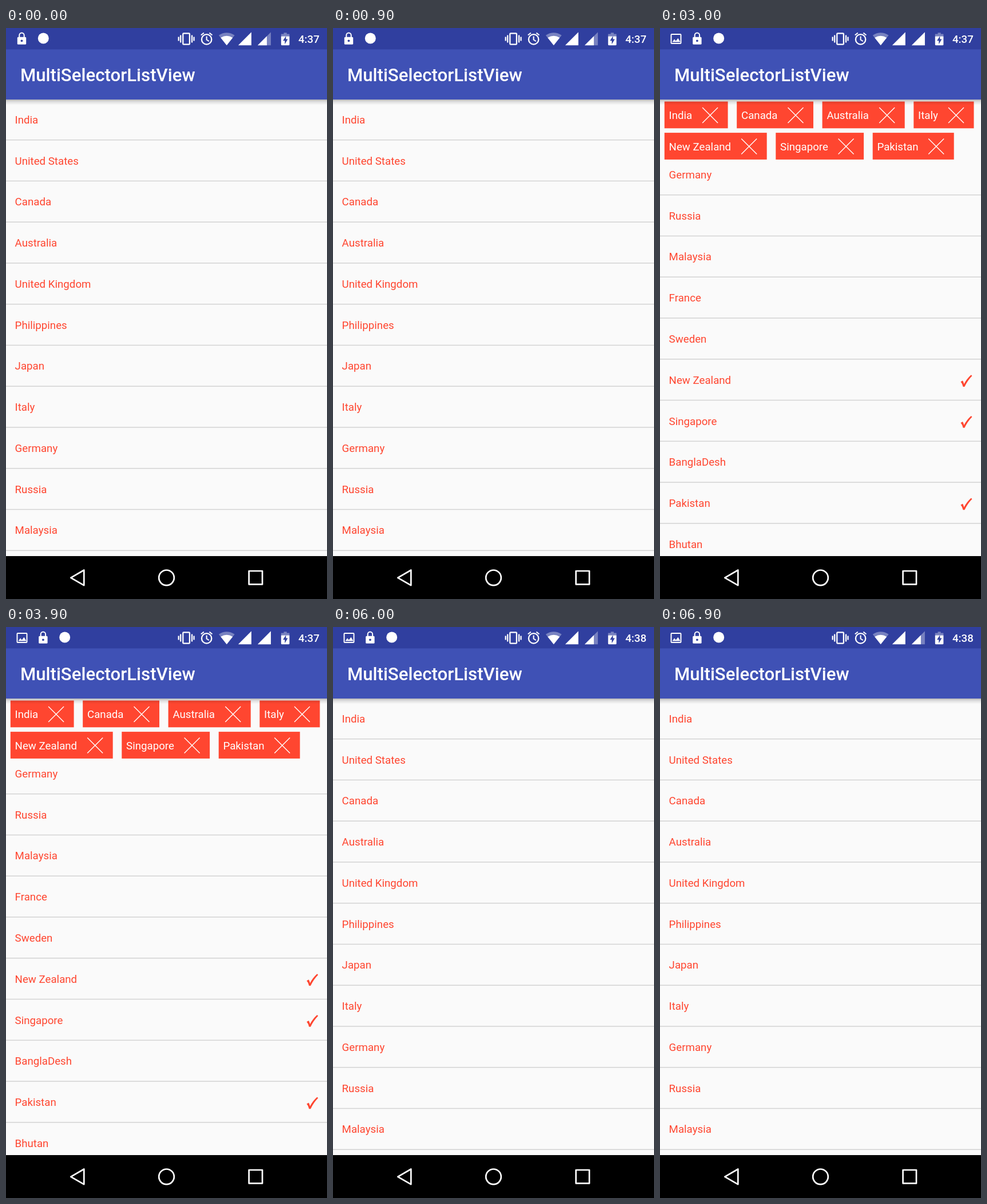
An HTML page for the animation above (7.5 s loop, 561x998 px).

```html
<!DOCTYPE html>
<html lang="en">
<head>
<meta charset="utf-8">
<title>MultiSelectorListView</title>
<style>
  html, body { margin: 0; width: 100%; height: 100%; overflow: hidden; background: #fafafa; }
  svg { display: block; width: 561px; height: 998px; }
  text { font-family: Roboto, sans-serif; font-size: 18.7px; white-space: pre; }
  .medium { font-weight: 500; fill: #fff; }
  .accent { fill: #ff4630; }
  .faded { fill: #fff; opacity: .35; }
  .line { fill: none; stroke: #fff; }
</style>
</head>
<body>
<svg viewBox="0 0 561 998">
  <defs>
    <linearGradient id="shade" x2="0" y2="1">
      <stop offset="0" stop-opacity=".29"/>
      <stop offset=".4" stop-opacity=".12"/>
      <stop offset="1" stop-opacity="0"/>
    </linearGradient>
    <clipPath id="listClip"><rect id="listBox" width="561"/></clipPath>
  </defs>
  <rect width="561" height="998" fill="#fafafa"/>
  <g clip-path="url(#listClip)"><g id="list"></g></g>
  <g id="chips"></g>

  <rect y="124.5" width="561" height="10" fill="url(#shade)"/>
  <rect width="561" height="125" fill="#3f51b5"/>
  <rect width="561" height="37.4" fill="#303f9f"/>
  <text class="medium" x="24.9" y="93.3" style="font-size:31.2px">MultiSelectorListView</text>

  <g id="picture">
    <path fill="#fff" fill-rule="evenodd" d="M20.500 10h15a2 2 0 0 1 2 2v14a2 2 0 0 1-2 2h-15a2 2 0 0 1-2-2v-14a2 2 0 0 1 2-2zM20.500 12v14h15v-14z"/>
    <path fill="#fff" d="M21.500 24.500l3.600-5 2.700 3.300 3.700-5 4 6.700z"/>
  </g>
  <g id="notices">
    <rect x="19.800" y="15.800" width="15.400" height="13" rx="1.600" fill="#fff"/>
    <path class="line" stroke-width="2" d="M23.300 16v-3.200a4.200 4.200 0 0 1 8.400 0v3.200"/>
    <circle cx="27.500" cy="22.300" r="1.900" fill="#303f9f"/>
    <circle cx="65.300" cy="18" r="9.500" fill="#fff"/>
  </g>

  <g class="line" stroke-width="2.300">
    <rect x="309.300" y="9.400" width="11.600" height="19.200" rx="1.200"/>
    <path d="M305.200 12.500v13M301.700 15.500v7M325 12.500v13M328.500 15.500v7"/>
    <circle cx="350.600" cy="19.900" r="8.700"/>
    <path stroke-width="2" d="M350.600 14.500v6l4.200 2.600M340.800 12.600l5-4.200M355.400 8.400l5 4.200"/>
  </g>
  <path class="faded" d="M385.700 30.300L371.800 12.700Q385.700 4 399.600 12.700z"/>
  <path fill="#fff" d="M385.700 30.300L375.200 17Q385.700 10.400 396.200 17z"/>
  <path fill="#fff" d="M405.800 30.300L428.800 7.300V30.300z"/>
  <path class="faded" d="M439.900 30.300L462.900 7.300V30.300z"/>
  <path id="signal" fill="#fff"/>
  <path class="faded" d="M480.800 14.500V10.500h4.700V8.200h5.200v2.300h4.700v4z"/>
  <path fill="#fff" d="M480.800 14.500h14.600v14.300a1.500 1.500 0 0 1-1.500 1.500h-11.600a1.500 1.500 0 0 1-1.500-1.500z"/>
  <path fill="#303f9f" d="M489.300 14v5.600h3.200l-5.200 8.600v-6h-3.300z"/>
  <text id="clock" class="medium" x="511" y="26"></text>

  <rect y="923" width="561" height="75"/>
  <g class="line" stroke-width="2.700" stroke-linejoin="round">
    <path d="M113.300 960.800L136.300 947.500V974.100z"/>
    <circle cx="280.500" cy="960.800" r="13.300"/>
    <rect x="424.600" y="949" width="23.400" height="23.400"/>
  </g>
</svg>
<script>
const $ = id => document.getElementById(id);
const ROW = 71.76, STEP = 1500, TOP = 124.6, PANEL = 109.2;
const countries = ["India", "United States", "Canada", "Australia", "United Kingdom",
  "Philippines", "Japan", "Italy", "Germany", "Russia", "Malaysia", "France", "Sweden",
  "New Zealand", "Singapore", "BanglaDesh", "Pakistan", "Bhutan"];
const chipWidth = { India: 110.8, Canada: 133.8, Australia: 144.1, Italy: 105.2,
  "New Zealand": 178.9, Singapore: 153.8, Pakistan: 142 };

const first = ["India", "Canada", "Australia", "Italy"];
const states = [
  { picked: [], scroll: 0, clock: "4:37", icons: 1 },
  { picked: first, scroll: 0, clock: "4:37", strong: true },
  { picked: [...first, "New Zealand", "Singapore", "Pakistan"], scroll: 587.2, clock: "4:37", strong: true },
  { picked: ["India", "Australia", "Italy"], scroll: 0, clock: "4:37" },
  { picked: [], scroll: 0, clock: "4:38" }
];

const tick = "M525.500 272.600L529 270.600Q530.500 273 531.300 276.600Q536 267.500 543.700 260.600L545.500 262.200Q537.300 270.500 532.400 281.200H529.600Q528.500 276 525.500 272.600z";

function listRow(name, i, picked) {
  const y = i * ROW;
  return `<text class="accent" x="15.600" y="${y + 42.300}">${name}</text>` +
    `<rect y="${y + 70.300}" width="561" height="1.500" fill="#d3d3d3"/>` +
    (picked.includes(name) ? `<path class="accent" transform="translate(0 ${y - 233.800})" d="${tick}"/>` : "");
}

function chipRow(picked) {
  let x = 7.8, y = 128.5;
  return picked.map(name => {
    const w = chipWidth[name];
    if (x + w > 556) { x = 7.8; y += 54.6; }
    const chip = `<g transform="translate(${x} ${y})">` +
      `<rect class="accent" width="${w}" height="46.800"/>` +
      `<text x="7.800" y="30.700" fill="#fff">${name}</text>` +
      `<path class="line" stroke-width="1.400" d="M${w - 44.500} 10.500l27 27m0-27l-27 27"/></g>`;
    x += w + 15.6;
    return chip;
  }).join("");
}

let shown;
function render(time) {
  const state = states[Math.floor(time / STEP) % states.length];
  if (state === shown) return;
  shown = state;
  const { picked, scroll, clock, strong, icons } = state;
  const top = TOP + (picked.length ? PANEL : 0);
  $("listBox").setAttribute("y", top);
  $("listBox").setAttribute("height", 923 - top);
  $("list").setAttribute("transform", `translate(0 ${top - scroll})`);
  $("list").innerHTML = countries.map((name, i) => listRow(name, i, picked)).join("");
  $("chips").innerHTML = chipRow(picked);
  $("clock").textContent = clock;
  $("picture").style.display = icons ? "none" : "";
  $("notices").setAttribute("transform", `translate(${icons ? 0 : 37.4})`);
  const edge = strong ? 23 : 16;
  $("signal").setAttribute("d", `M439.900 30.300l${edge} ${-edge}v${edge}z`);
}

const start = performance.now();
function frame() {
  render(performance.now() - start);
  requestAnimationFrame(frame);
}
frame();
</script>
</body>
</html>
```
